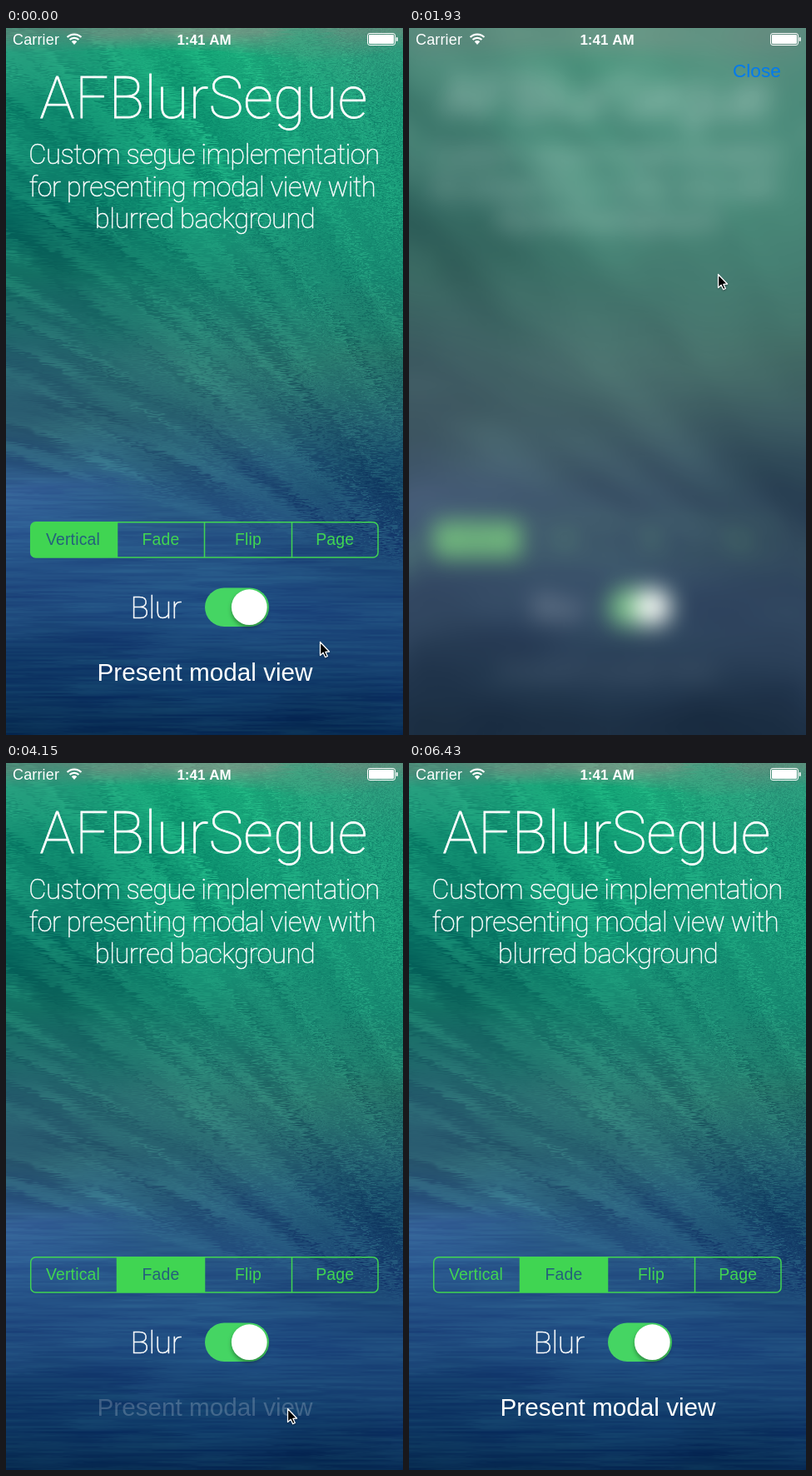
Write an HTML page with a canvas that moves like this. It is 477x848 px and loops after 6.69 s.

```html
<!DOCTYPE html>
<html lang="en">
<head>
<meta charset="utf-8">
<title>AFBlurSegue</title>
<style>
html, body { margin: 0; width: 100%; height: 100%; overflow: hidden; background: #0a2c50; }
canvas { display: block; width: 100vw; height: 100vh; }
</style>
</head>
<body>
<canvas id="stage" width="477" height="848"></canvas>
<script>
const W = 477, H = 848, LOOP = 6690;
const ctx = document.getElementById('stage').getContext('2d');
const GREEN = '#40d552';
const SANS = '"Liberation Sans", Arial, sans-serif';
const THIN = 'Roboto, Inter, sans-serif';
const TABS = ['Vertical', 'Fade', 'Flip', 'Page'];
const TAB_X = [29.5, 133.5, 238.5, 343.5, 447];

const clamp = v => Math.max(0, Math.min(1, v));
const mix = (a, b, p) => a + (b - a) * p;
const smooth = p => p * p * (3 - 2 * p);
const easeOut = p => 1 - (1 - p) ** 3;
const span = (t, a, b) => clamp((t - a) / (b - a));

function layer(w = W, h = H) {
  const c = document.createElement('canvas');
  c.width = w;
  c.height = h;
  return c;
}

// ---- wallpaper ----
function hash(x, y) {
  let h = Math.imul(x, 374761393) + Math.imul(y, 668265263);
  h = Math.imul(h ^ (h >>> 13), 1274126177);
  return ((h ^ (h >>> 16)) >>> 0) / 4294967296;
}

function noise(x, y) {
  const i = Math.floor(x), j = Math.floor(y);
  const u = smooth(x - i), v = smooth(y - j);
  return mix(mix(hash(i, j), hash(i + 1, j), u),
             mix(hash(i, j + 1), hash(i + 1, j + 1), u), v) - 0.5;
}

// rows of tones: y, then left, middle, right
const TONES = [
  [0, '4c8a78', '6a9a84', '578f7c'],
  [32, '24997b', '17a979', '2c9a7c'],
  [100, '108a6f', '14a078', '1c9a79'],
  [200, '0d7a69', '129876', '179776'],
  [300, '10695f', '1a8570', '188a72'],
  [400, '276470', '2b7672', '247569'],
  [470, '2d6174', '2a6673', '1f5a6b'],
  [520, '2c5c80', '295e7a', '174a69'],
  [550, '356398', '285a80', '154467'],
  [600, '2b5a91', '285787', '1c4874'],
  [700, '1e497c', '1f4d82', '1d497c'],
  [745, '133d6c', '194576', '184274'],
  [790, '0d3562', '0f3a69', '103867'],
  [848, '072b50', '082c53', '082d55']
].map(([y, ...cols]) => [y, cols.map(c => [0, 2, 4].map(i => parseInt(c.substr(i, 2), 16)))]);

function tone(x, y) {
  let k = 0;
  while (k < TONES.length - 2 && TONES[k + 1][0] <= y) k++;
  const [y0, a] = TONES[k], [y1, b] = TONES[k + 1];
  const v = span(y, y0, y1);
  const c = clamp(x / W) * 2, i = Math.min(1, Math.floor(c)), u = smooth(c - i);
  return [0, 1, 2].map(n => mix(mix(a[i][n], a[i + 1][n], u), mix(b[i][n], b[i + 1][n], u), v));
}

function paintWallpaper() {
  const c = layer(), g = c.getContext('2d');
  const img = g.createImageData(W, H);
  for (let y = 0; y < H; y++) {
    for (let x = 0; x < W; x++) {
      // each row is shifted sideways in ragged dashes
      const sx = x + noise(x / 9, y * 1.37) * 30;
      // height above the wave's lower edge; streaks steepen with it
      const rise = 520 + 0.22 * sx + 0.0005 * sx * sx - y;
      const a = rise / (750 - sx);
      const water = smooth(clamp((y - 510 - x * 0.24) / 30));
      const fan = noise(a * 42, sx / 110) * 40 + noise(a * 105 + 40, sx / 60) * 34;
      const sea = noise(sx / 50, y / 2 + 300) * 20 + noise(sx / 120 + 9, y / 11) * 16;
      const d = mix(fan * mix(0.4, 1, span(y, 0, 60)), sea, water);
      const col = tone(sx, y + noise(sx / 60, y / 40) * 22);
      const o = (y * W + x) * 4;
      img.data[o] = col[0] + d * 0.4;
      img.data[o + 1] = col[1] + d * 0.8;
      img.data[o + 2] = col[2] + d * 0.5;
      img.data[o + 3] = 255;
    }
  }
  g.putImageData(img, 0, 0);
  return c;
}
const wallpaper = paintWallpaper();

// ---- screens ----
function label(g, text, x, y, font, color, align = 'left', track = 0) {
  g.font = font;
  g.fillStyle = color;
  g.textAlign = align;
  g.letterSpacing = track + 'px';
  g.fillText(text, x, y);
  g.letterSpacing = '0px';
}

function thin(g, text, x, y, size, track, align = 'center') {
  label(g, text, x, y, `100 ${size}px ${THIN}`, '#fff', align, track);
  g.letterSpacing = track + 'px';
  g.strokeStyle = '#fff';
  g.lineWidth = 0.3 + size * 0.007;
  g.strokeText(text, x, y);
  g.letterSpacing = '0px';
}

function box(g, x, y, w, h, r) {
  g.beginPath();
  g.roundRect(x, y, w, h, r);
}

function drawTabs(g, active) {
  const top = 592.7, h = 42.3;
  g.save();
  box(g, 29.7, top, 417.3, h, 6);
  g.clip();
  g.fillStyle = GREEN;
  g.fillRect(TAB_X[active], top, TAB_X[active + 1] - TAB_X[active], h);
  g.restore();
  g.strokeStyle = GREEN;
  g.lineWidth = 1.5;
  box(g, 29.7, top, 417.3, h, 6);
  g.stroke();
  g.beginPath();
  for (const x of TAB_X.slice(1, 4)) {
    g.moveTo(x, top);
    g.lineTo(x, top + h);
  }
  g.stroke();
  TABS.forEach((name, i) => {
    const mid = (TAB_X[i] + TAB_X[i + 1]) / 2;
    label(g, name, mid - (i ? 0 : 1), 620, `19.4px ${SANS}`, i === active ? '#24607c' : GREEN, 'center', 0.2);
  });
}

function drawSwitch(g) {
  g.fillStyle = '#45d563';
  box(g, 239, 671.5, 77, 46.5, 23.2);
  g.fill();
  g.save();
  g.shadowColor = 'rgba(0,0,0,.35)';
  g.shadowBlur = 5;
  g.shadowOffsetY = 3;
  g.fillStyle = '#fff';
  g.beginPath();
  g.arc(292.3, 694.7, 21.4, 0, 7);
  g.fill();
  g.restore();
}

function drawHome(g, active, buttonAlpha) {
  g.drawImage(wallpaper, 0, 0);
  thin(g, 'AFBlurSegue', 237.5, 107.5, 70.5, 0.2);
  thin(g, 'Custom segue implementation', 238, 163, 32.8, -0.55);
  thin(g, 'for presenting modal view with', 236, 202, 32.8, -0.55);
  thin(g, 'blurred background', 239, 240, 32.8, -0.55);
  drawTabs(g, active);
  thin(g, 'Blur', 149.5, 707.5, 37, -0.3, 'left');
  drawSwitch(g);
  label(g, 'Present modal view', 239, 782.5, `29.7px ${SANS}`, `rgba(255,255,255,${buttonAlpha})`, 'center');
}

function blurredHome(active) {
  const pad = 40;
  const shot = layer(), wide = layer(W + pad * 2, H + pad * 2), out = layer();
  drawHome(shot.getContext('2d'), active, 0.2);
  const w = wide.getContext('2d');
  w.drawImage(shot, 0, 0, wide.width, wide.height);
  w.drawImage(shot, pad, pad);
  const o = out.getContext('2d');
  o.filter = 'blur(14px) saturate(50%)';
  o.drawImage(wide, -pad, -pad);
  return out;
}
const backdrops = [blurredHome(0), blurredHome(1)];

function drawModal(active, top, alpha, closeAlpha) {
  ctx.save();
  ctx.globalAlpha = alpha;
  ctx.translate(0, top);
  ctx.drawImage(backdrops[active], 0, 0);
  ctx.globalAlpha = alpha * closeAlpha;
  label(ctx, 'Close', 389, 59, `22.6px ${SANS}`, '#007aee');
  ctx.restore();
}

function drawStatus() {
  label(ctx, 'Carrier', 8, 20, `18px ${SANS}`, '#fff', 'left', 0.15);
  label(ctx, '1:41 AM', 238, 20, `bold 17px ${SANS}`, '#fff', 'center');
  // wifi fan
  ctx.strokeStyle = ctx.fillStyle = '#fff';
  ctx.lineWidth = 2.2;
  for (const r of [7.7, 11.9]) {
    ctx.beginPath();
    ctx.arc(82, 19.5, r, -Math.PI * 0.75, -Math.PI * 0.25);
    ctx.stroke();
  }
  ctx.beginPath();
  ctx.moveTo(82, 20);
  ctx.arc(82, 19.5, 4.6, -Math.PI * 0.75, -Math.PI * 0.25);
  ctx.fill();
  // battery
  ctx.lineWidth = 1;
  box(ctx, 434.5, 6.5, 33, 14, 2.5);
  ctx.stroke();
  box(ctx, 436, 8, 30, 11, 1.2);
  ctx.fill();
  box(ctx, 468.7, 11, 2, 5, 1);
  ctx.fill();
}

// ---- pointer ----
const ARROW = [[0, 0], [0, 16], [3.6, 12.8], [6.2, 18.2], [8.8, 17], [6.3, 11.8], [11, 11.5]];
// time, x, y
const PATH = [
  [660, 377, 736], [940, 323, 789],
  [1540, 323, 789], [1930, 371, 295],
  [2020, 371, 295], [2290, 408, 43],
  [2710, 408, 43], [3350, 190, 610],
  [3640, 190, 610], [4060, 338, 774],
  [4980, 338, 774], [5440, 408, 43],
  [6090, 408, 43], [6430, 438, 870]
];

function pointerAt(t) {
  if (t <= PATH[0][0]) return PATH[0].slice(1);
  const k = PATH.findIndex(p => p[0] > t);
  if (k < 0) return null;
  const [t0, x0, y0] = PATH[k - 1], [t1, x1, y1] = PATH[k];
  const p = smooth(span(t, t0, t1));
  return [mix(x0, x1, p), mix(y0, y1, p)];
}

function drawPointer(pos) {
  if (!pos) return;
  ctx.save();
  ctx.translate(pos[0] + 0.5, pos[1] + 0.5);
  ctx.beginPath();
  ARROW.forEach(([x, y]) => ctx.lineTo(x, y));
  ctx.closePath();
  ctx.fillStyle = '#000';
  ctx.strokeStyle = '#fff';
  ctx.lineWidth = 1.3;
  ctx.lineJoin = 'round';
  ctx.fill();
  ctx.shadowColor = 'rgba(0,0,0,.4)';
  ctx.shadowBlur = 2;
  ctx.shadowOffsetY = 1;
  ctx.stroke();
  ctx.restore();
}

// dims at once on press, comes back softly after release
function pressAlpha(t, down, up, low) {
  return t < down ? 1 : mix(low, 1, span(t, up, up + 250));
}

function draw(t) {
  const active = t < 3560 ? 0 : 1;
  const button = t < 3000 ? pressAlpha(t, 1330, 1480, 0.2) : pressAlpha(t, 4150, 4690, 0.2);
  drawHome(ctx, active, button);

  if (t >= 1470 && t < 3040) {
    const shown = easeOut(span(t, 1470, 1920));
    const gone = easeOut(span(t, 2540, 3040));
    drawModal(0, Math.round(H * (1 - shown + gone)), 1, pressAlpha(t, 2400, 2600, 0.35));
  } else if (t >= 4680 && t < 5990) {
    const alpha = smooth(span(t, 4670, 4885)) * (1 - smooth(span(t, 5640, 5990)));
    drawModal(1, 0, alpha, pressAlpha(t, 5500, 5640, 0.35));
  }
  drawStatus();
  drawPointer(pointerAt(t));
}

function tick() {
  draw(performance.now() % LOOP);
  requestAnimationFrame(tick);
}
tick();
</script>
</body>
</html>
```
